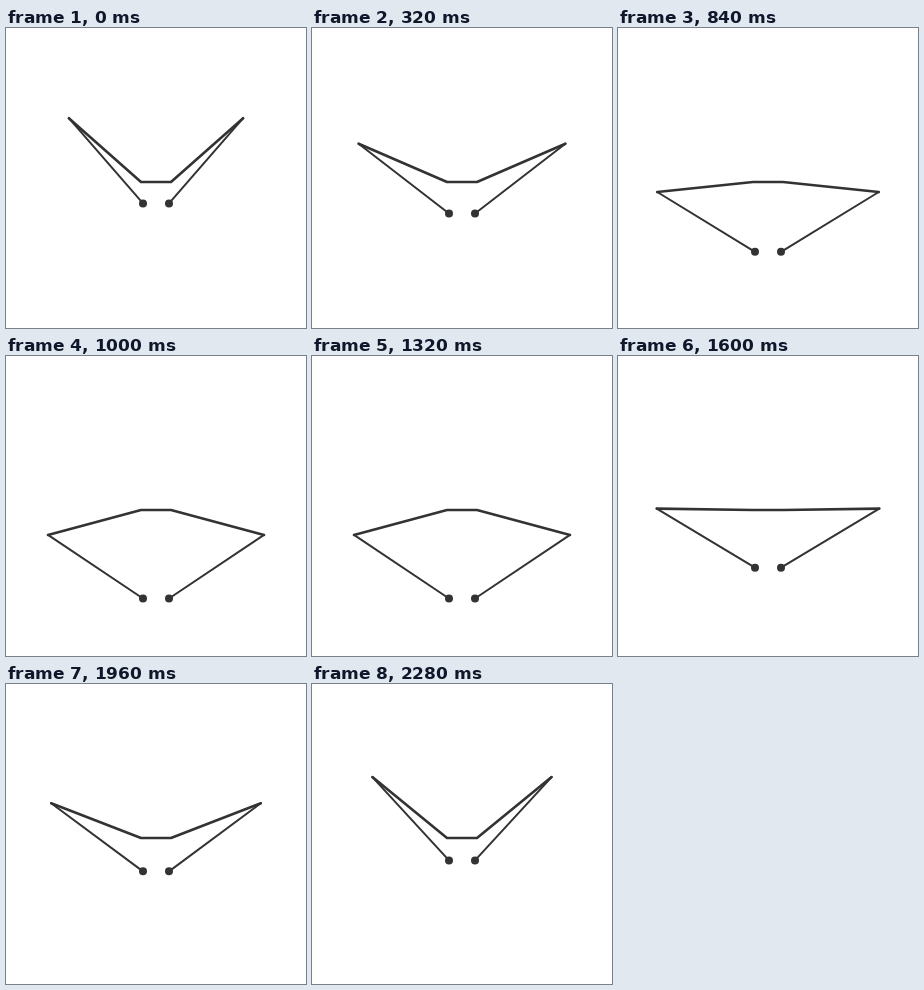
These frames come from a looping animation (300 px wide and 300 px high, 2.32 s). An HTML page:

```html
<!DOCTYPE html>
<html lang="en">
<head>
<meta charset="utf-8">
<title>Wing linkage</title>
<style>
  html, body { margin: 0; width: 100%; height: 100%; overflow: hidden; background: #fff; }
  svg { display: block; width: 100%; height: 100%; }
  path { fill: none; stroke: #333; stroke-linecap: round; stroke-linejoin: round; }
  circle { fill: #333; }
</style>
</head>
<body>
<svg viewBox="0 0 300 300">
  <path id="wings" stroke-width="2.6"/>
  <path id="rods" stroke-width="2"/>
  <circle id="left" cx="137" r="4"/>
  <circle id="right" cx="163" r="4"/>
</svg>
<script>
const LOOP = 2320, STEP = 40;
const HIP = { x: 135, y: 154 }, DOT_X = 137, ARM = 96.3;
const LOW = -41.5, HIGH = 22.6, SPEED = 0.0565; // degrees, degrees per ms

const [wings, rods, left, right] =
  ["wings", "rods", "left", "right"].map(id => document.getElementById(id));

function pose(time) {
  const swing = Math.min(time, LOOP - time);
  const deg = Math.min(LOW + SPEED * swing, HIGH);
  const rad = deg * Math.PI / 180;
  const x = HIP.x - ARM * Math.cos(rad);
  const y = HIP.y + ARM * Math.sin(rad);
  // The rod flexes slightly towards the ends of the swing.
  const rod = 114.7 - 0.00118 * (deg + 3) ** 2;
  const dotY = y + Math.sqrt(rod ** 2 - (DOT_X - x) ** 2);
  return { x, y, dotY };
}

function draw(time) {
  const { x, y, dotY } = pose(time);
  const mx = 300 - x;
  wings.setAttribute("d", `M${x} ${y}L${HIP.x} ${HIP.y}H${300 - HIP.x}L${mx} ${y}`);
  rods.setAttribute("d", `M${x} ${y}L${DOT_X} ${dotY}M${mx} ${y}L${300 - DOT_X} ${dotY}`);
  left.setAttribute("cy", dotY);
  right.setAttribute("cy", dotY);
}

const start = performance.now();
function tick() {
  const t = (performance.now() - start) % LOOP;
  draw(Math.floor(t / STEP) * STEP);
  requestAnimationFrame(tick);
}
draw(0);
requestAnimationFrame(tick);
</script>
</body>
</html>
```
